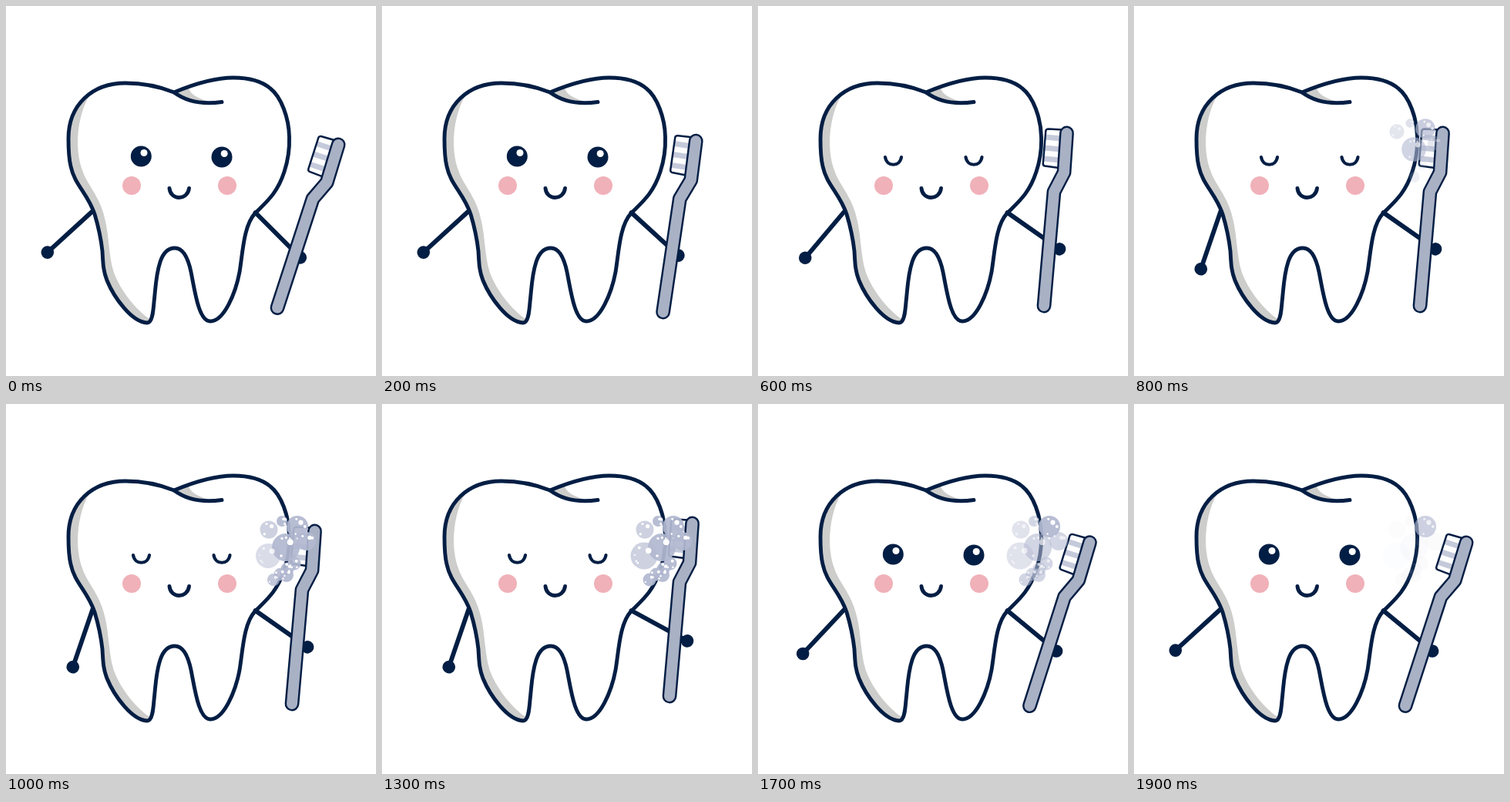
Recreate the animation shown at these times as an HTML page. Size 480 px wide and 480 px high, loop 2 s.

```html
<!DOCTYPE html>
<html lang="en">
<head>
<meta charset="utf-8">
<title>Brushing tooth</title>
<style>
  html, body { margin: 0; width: 100%; height: 100%; overflow: hidden; background: #fff; }
  svg { display: block; width: 100%; height: 100%; }
  .line { fill: none; stroke: #031e44; stroke-width: 4.9; stroke-linecap: round; stroke-linejoin: round; }
  .arm { stroke-width: 5.8; }
  .lid { stroke-width: 4.2; }
  .edge { stroke-width: 2.5; }
  .ink { fill: #031e44; }
  .shade { fill: #cdcdcb; }
  .cheek { fill: #f0b1b9; }
  .handle { fill: none; stroke-linecap: round; stroke-linejoin: round; }
</style>
</head>
<body>
<svg viewBox="0 0 480 480">
  <defs>
    <path id="tooth" d="M218 112C198 104 178 100 155 100C112 100 81 128 81 172C81 184 82 200 84 208C89 232 106 243 115 270C121 290 123 300 125 318C126 335 126 343 131 356C140 378 163 410 183 411C190 411 191 396 192 384C194 368 194 350 200 332C204 320 211 314 219 314C229 314 236 326 240 345C245 370 250 409 265 409C283 409 298 372 303 345C307 322 308 285 323 269C338 254 352 243 361 215C366 200 368 185 367.5 170C367 145 357 118 343 107C330 96 313 93 295 93C268 93 242 102 218 112Z"/>
    <clipPath id="inside"><use href="#tooth"/></clipPath>
    <path id="stem" d="M373 379L386 231L399 206L402.5 155"/>
    <path id="bristles" d="M379 149.5L397 150.5L392 200L374 197.5Q371.5 197 371.8 194L375.3 152Q375.7 149.5 379 149.5Z"/>
  </defs>

  <use href="#tooth" fill="#fff"/>
  <g class="shade" clip-path="url(#inside)">
    <path d="M108 116C90 148 90 190 99 213C105 232 121 245 128 275C134 298 133 325 140 346C149 370 168 393 186 406L183 420L60 400V120Z"/>
    <path d="M218 112L236 105C239 115 250 121 268 125Q240 125 218 112Z"/>
  </g>
  <use href="#tooth" class="line"/>
  <path class="line" d="M218 112C234 124 255 128 280 124.5"/>

  <circle class="cheek" cx="163" cy="233" r="12"/>
  <circle class="cheek" cx="287" cy="233" r="12"/>
  <path class="line" d="M212 236.5C213.5 252.5 235.5 252.5 237.5 236.5"/>
  <g id="open">
    <circle class="ink" cx="175.3" cy="195" r="13.5"/>
    <circle class="ink" cx="280" cy="196" r="13.5"/>
    <circle fill="#fff" cx="179" cy="190.5" r="4.5"/>
    <circle fill="#fff" cx="283.2" cy="191.5" r="4.5"/>
  </g>
  <path id="shut" class="line lid" d="M165 196C167 209 184 209 186 196M269.5 196C271.5 209 288.5 209 290.5 196"/>

  <g id="left">
    <path class="line arm" d="M112.5 266v79.5"/>
    <circle class="ink" cx="112.5" cy="345.5" r="8.3"/>
  </g>
  <g id="right">
    <path class="line arm" d="M323.5 268h82.5"/>
    <circle class="ink" cx="406" cy="268" r="8.3"/>
  </g>

  <g id="brush">
    <use href="#bristles" fill="#fff"/>
    <path fill="none" stroke="#c5cadb" stroke-width="7" d="M374.5 160l21.5 2M373.5 174l21.5 2M372.5 188l21.5 2"/>
    <use href="#bristles" class="line edge"/>
    <use href="#stem" class="handle" stroke="#031e44" stroke-width="18.8"/>
    <use href="#stem" class="handle" stroke="#a9b1c5" stroke-width="13.9"/>
  </g>
  <g id="foam"></g>
</svg>
<script>
  const LOOP = 2000, STEP = 100;
  const $ = id => document.getElementById(id);
  const clamp = (v, lo = 0, hi = 1) => Math.max(lo, Math.min(hi, v));
  const mix = (a, b, k) => a + (b - a) * k;

  // Smooth rise from 0 to 1 that starts at a given time.
  function ease(t, start, length) {
    const k = clamp((t - start) / length);
    return k * k * (3 - 2 * k);
  }

  function brushPose(t) {
    const near = ease(t, 0, 300) - ease(t, 1400, 330);
    const stroke = Math.cos((clamp(t, 300, 1500) - 500) / 400 * 2 * Math.PI);
    return {
      x: mix(352, 371 + 2 * stroke, near),
      y: mix(391.5, 389 - 10 * stroke, near),
      tilt: 13 * (1 - near),
      arm: mix(t < 300 ? 45 : 39.5, 35 - 6.5 * stroke, near)
    };
  }

  // Main bubbles (x, y, radius) in order of appearance, then a trail of small ones.
  const bubbles = [[378, 159, 14], [363, 186, 18], [341, 163, 11.5],
                   [358, 152, 7], [390, 178, 12], [364, 222, 9]];
  for (let i = 0; i < 4; i++) bubbles.push([374 - 9 * i, 207 + 7 * i, 8.5]);
  bubbles.push([340, 197, 17.5]);

  let seed = 7;
  function random() {
    seed = seed * 16807 % 2147483647;
    return seed / 2147483647;
  }

  function circle(fill, x, y, r) {
    const el = document.createElementNS("http://www.w3.org/2000/svg", "circle");
    Object.entries({ fill, cx: x, cy: y, r }).forEach(([k, v]) => el.setAttribute(k, v));
    return el;
  }

  // Bodies lie below all glints; every circle sits around its bubble's centre.
  const bodies = bubbles.map(([x, , r]) => {
    const el = circle("#b2b8d0", 0, 0, r);
    el.setAttribute("fill-opacity", x < 345 ? 0.65 : 0.93);
    return el;
  });
  const glints = bubbles.map(([, , r]) => {
    const g = document.createElementNS("http://www.w3.org/2000/svg", "g");
    g.append(circle("#fff", r * 0.32, -r * 0.38, Math.max(2, r * 0.22)));
    for (let i = 0; i < r / 5; i++) {
      const turn = random() * 2 * Math.PI;
      g.append(circle("#fff", r * 0.7 * Math.cos(turn), r * 0.7 * Math.sin(turn), 1 + random()));
    }
    return g;
  });
  $("foam").append(...bodies, ...glints);

  function drawFoam(t) {
    bubbles.forEach(([x, y], i) => {
      const grow = clamp((t - 650 - 20 * i) / 200);
      const end = i ? 1920 : 2150;
      const alpha = grow * clamp((end - t) / 350);
      for (const el of [bodies[i], glints[i]]) {
        el.setAttribute("transform", `translate(${x} ${y}) scale(${mix(0.65, 1, grow)})`);
        el.setAttribute("opacity", alpha);
      }
    });
  }

  function draw(t) {
    const { x, y, tilt, arm } = brushPose(t);
    const wave = 47.6 - 28.7 * (ease(t, 500, 300) - ease(t, 1400, 400));
    $("brush").setAttribute("transform", `translate(${x} ${y}) rotate(${tilt}) translate(-373 -379)`);
    $("right").setAttribute("transform", `rotate(${arm} 323.5 268)`);
    $("left").setAttribute("transform", `rotate(${wave} 112.5 266)`);
    const asleep = t >= 600 && t < 1600;
    $("open").style.display = asleep ? "none" : "";
    $("shut").style.display = asleep ? "" : "none";
    drawFoam(t);
  }

  const began = performance.now();
  function tick() {
    const t = (performance.now() - began) % LOOP;
    draw(Math.floor(t / STEP) * STEP);
    requestAnimationFrame(tick);
  }
  tick();
</script>
</body>
</html>
```
